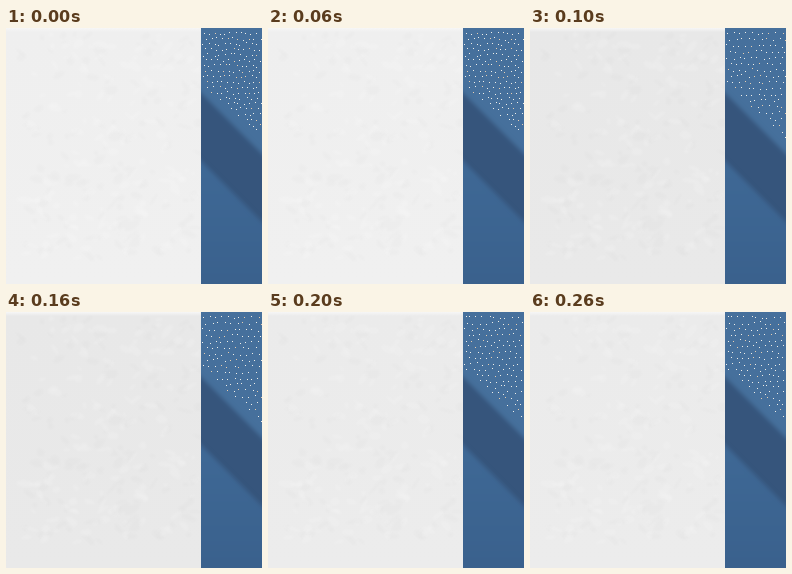
These frames come from a looping animation (256 px wide and 256 px high, 0.3 s). An HTML page with a canvas:

```html
<!DOCTYPE html>
<html lang="en">
<head>
<meta charset="utf-8">
<title>Plaster and blue</title>
<style>
html, body { margin: 0; width: 100%; height: 100%; overflow: hidden; background: #ebebeb; }
canvas { display: block; width: 256px; height: 256px; }
</style>
</head>
<body>
<canvas id="stage" width="256" height="256"></canvas>
<script>
const SIZE = 256, EDGE = 195, STEP = 100;
// Brightness of the plaster and spacing of the specks in each pose
const POSES = [{ gray: 239, gap: 5.4 }, { gray: 232, gap: 6.1 }, { gray: 235, gap: 5.8 }];
const ctx = document.getElementById('stage').getContext('2d');

function seeded(seed) {
  return () => {
    seed = (seed + 0x6D2B79F5) | 0;
    let t = Math.imul(seed ^ (seed >>> 15), 1 | seed);
    t = (t + Math.imul(t ^ (t >>> 7), 61 | t)) ^ t;
    return ((t ^ (t >>> 14)) >>> 0) / 4294967296;
  };
}

function fade(y0, y1, from, to) {
  const g = ctx.createLinearGradient(0, y0, 0, y1);
  g.addColorStop(0, from);
  g.addColorStop(1, to);
  return g;
}

// Rough light and dark flakes, painted once on a clear layer
function makeTexture() {
  const layer = document.createElement('canvas');
  layer.width = EDGE;
  layer.height = SIZE;
  const pen = layer.getContext('2d'), rnd = seeded(11);
  for (let i = 0; i < 260; i++) {
    pen.save();
    pen.translate(15 + rnd() * 180, 5 + rnd() * 225);
    pen.rotate(rnd() * 2 - 1);
    pen.scale(3 + rnd() * 8, 2 + rnd() * 4);
    pen.beginPath();
    for (let k = 0; k < 7; k++) {
      const a = k / 7 * Math.PI * 2, r = 0.6 + rnd() * 0.4;
      pen.lineTo(Math.cos(a) * r, Math.sin(a) * r);
    }
    pen.fillStyle = rnd() < 0.5 ? 'rgba(255,255,255,.14)' : 'rgba(0,0,0,.01)';
    pen.fill();
    pen.restore();
  }
  return layer;
}

const texture = makeTexture();

function plaster(gray) {
  const tone = v => `rgb(${v},${v},${v})`;
  ctx.fillStyle = fade(0, SIZE, tone(gray), tone(gray + 1));
  ctx.fillRect(0, 0, EDGE, SIZE);
  ctx.filter = 'blur(1px)';
  ctx.drawImage(texture, 0, 0);
  ctx.filter = 'none';
  ctx.fillStyle = fade(0, 4, '#f6f6f6', 'rgba(246,246,246,0)');
  ctx.fillRect(0, 0, EDGE, 4);
}

// Fills everything below a slanted line that starts at height y
function below(y, fill, blur) {
  ctx.filter = `blur(${blur}px)`;
  ctx.fillStyle = fill;
  ctx.beginPath();
  ctx.moveTo(EDGE - 10, y - 10);
  ctx.lineTo(SIZE + 10, y + 71);
  ctx.lineTo(SIZE + 10, SIZE + 10);
  ctx.lineTo(EDGE - 10, SIZE + 10);
  ctx.fill();
  ctx.filter = 'none';
}

function blue() {
  ctx.save();
  ctx.beginPath();
  ctx.rect(EDGE, 0, SIZE - EDGE, SIZE);
  ctx.clip();
  ctx.fillStyle = '#46709c';
  ctx.fillRect(EDGE, 0, SIZE - EDGE, SIZE);
  below(65, '#36557c', 2);
  below(133, fade(130, SIZE, '#3f6996', '#3a618d'), 2);
  ctx.restore();
}

function specks(gap, seed) {
  const rnd = seeded(seed);
  for (let row = 0, y = 4; y < 110; row++, y += gap) {
    for (let x = EDGE + 1 + row % 2 * gap / 2; x < SIZE - 2; x += gap) {
      const px = Math.floor(x + rnd() * 3), py = Math.floor(y + rnd() * 3);
      const warm = rnd() < 0.15;
      if (py > 55 + (px - EDGE) * 0.9) continue;
      ctx.fillStyle = warm ? '#e6cdb0' : '#efefea';
      ctx.fillRect(px, py, 1, 1);
    }
  }
}

let shown = -1;
function tick() {
  const pose = Math.floor(performance.now() / STEP) % POSES.length;
  if (pose !== shown) {
    const { gray, gap } = POSES[pose];
    plaster(gray);
    blue();
    specks(gap, 41 + pose);
    shown = pose;
  }
  requestAnimationFrame(tick);
}
tick();
</script>
</body>
</html>
```
